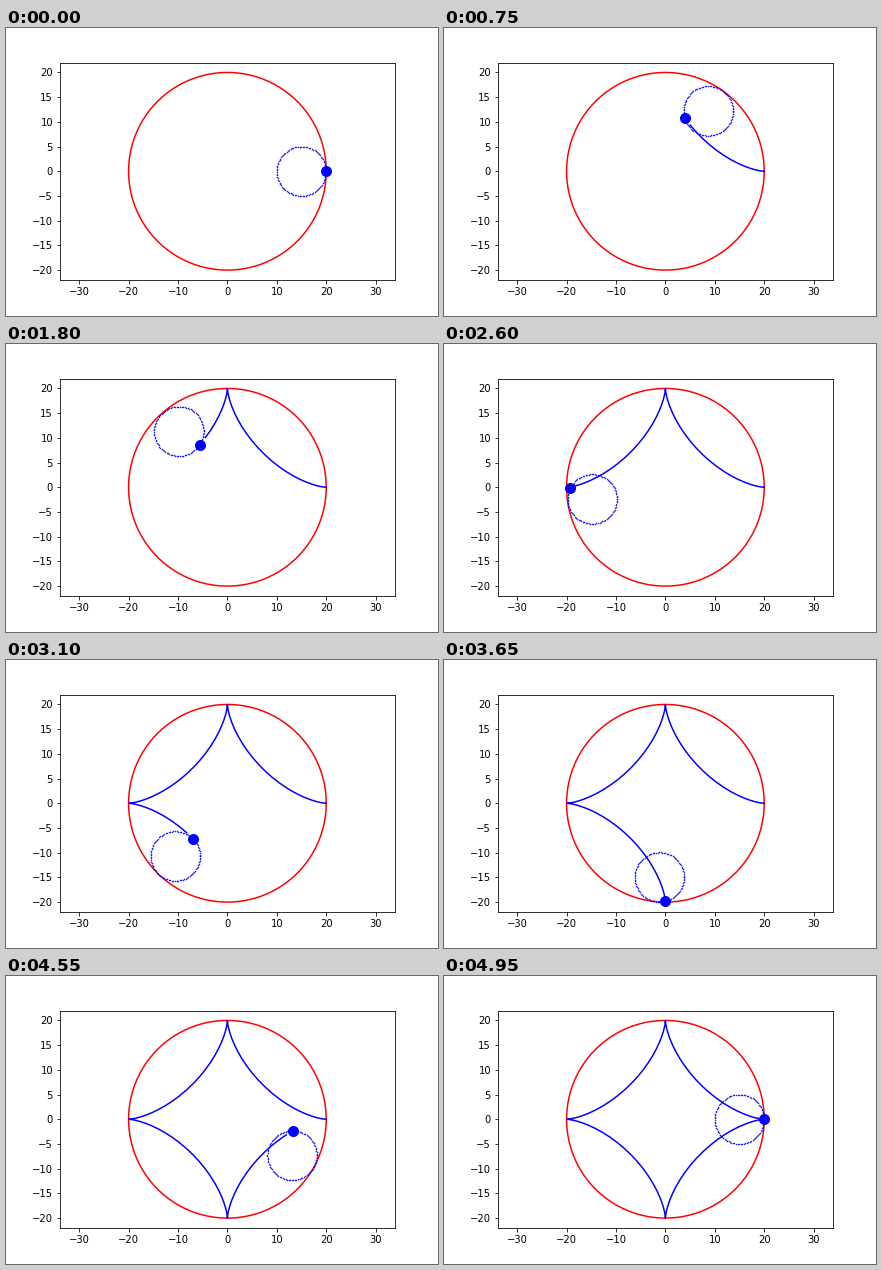
A matplotlib script that plays this animation: 432 px wide and 288 px high, repeating every 5 s.

```python
import numpy as np
import matplotlib.pyplot as plt
from matplotlib.animation import FuncAnimation

BIG, SMALL = 20, 5
FRAMES, INTERVAL = 100, 50

theta = np.linspace(0, 2 * np.pi, FRAMES)
cos, sin = np.cos(theta), np.sin(theta)

# Path of a rim point on the rolling circle: an astroid
path_x, path_y = BIG * cos**3, BIG * sin**3

fig = plt.figure(figsize=(6, 4), dpi=72, facecolor="white")
ax = fig.add_axes([0.125, 0.125, 0.775, 0.755])

# Equal scale on both axes
half_y = 1.1 * BIG
half_x = half_y * (6 * 0.775) / (4 * 0.755)
ax.set_xlim(-half_x, half_x)
ax.set_ylim(-half_y, half_y)
ax.set_xticks(range(-30, 31, 10))
ax.set_yticks(range(-20, 21, 5))

ax.plot(BIG * cos, BIG * sin, "r-", lw=1.5)
trace, = ax.plot([], [], "b-", lw=1.5)
wheel, = ax.plot([], [], "b.", ms=1)
dot, = ax.plot([], [], "bo", ms=10)


def update(i):
    cx = (BIG - SMALL) * cos[i]
    cy = (BIG - SMALL) * sin[i]
    wheel.set_data(cx + SMALL * cos, cy + SMALL * sin)
    trace.set_data(path_x[:i], path_y[:i])
    dot.set_data([path_x[i]], [path_y[i]])
    return trace, wheel, dot


anim = FuncAnimation(fig, update, frames=FRAMES, interval=INTERVAL,
                     repeat=True, repeat_delay=0, blit=False)
plt.show()
```
